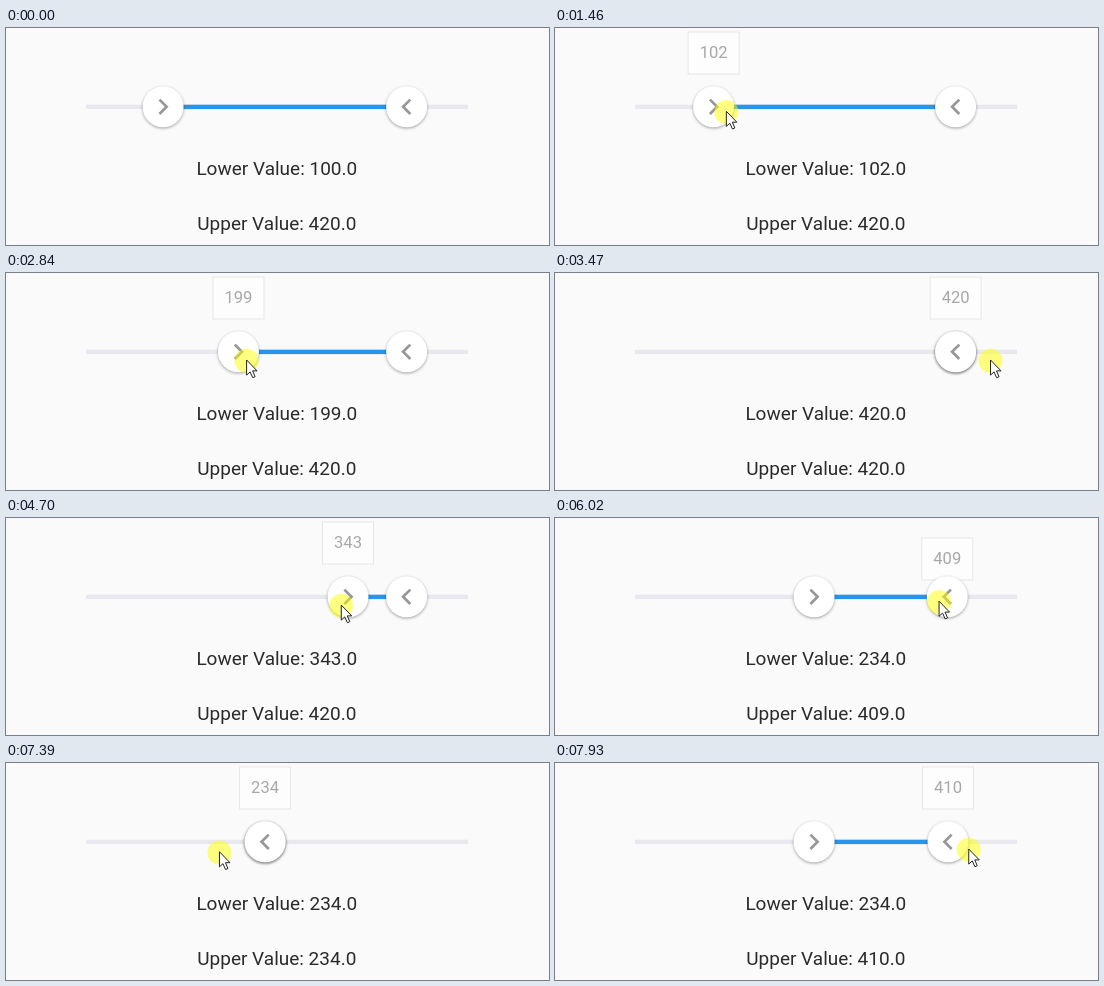
An HTML page that plays this animation: 543x217 px, repeating every 8000 ms.

```html
<!DOCTYPE html>
<html lang="en">
<head>
<meta charset="utf-8">
<title>Range slider</title>
<style>
  html, body { margin: 0; width: 100%; height: 100%; overflow: hidden; background: #fafafa; }
  svg { display: block; width: 543px; height: 217px; font-family: Roboto, sans-serif; }
  text { text-anchor: middle; }
  .label { font-size: 19px; fill: #2b2b2b; }
  .tip rect { fill: #fdfdfd; stroke: #e8e7e5; }
  .tip text { font-size: 16.6px; fill: #a8a8a8; }
  .knob circle { fill: #fff; filter: drop-shadow(0 1px 1.6px rgba(0, 0, 0, .36)); }
  #chevron { fill: #979797; }
</style>
</head>
<body>
<svg viewBox="0 0 543 217">
  <defs>
    <path id="chevron" transform="scale(1.36) translate(-12 -12)" d="M10 6 8.59 7.41 13.17 12l-4.58 4.59L10 18l6-6z"/>
  </defs>
  <rect x="80" y="76.7" width="382" height="4.4" fill="#e8e8ee"/>
  <rect id="range" y="76.7" height="4.4" fill="#2794ee"/>
  <g id="lowerTip" class="tip"><rect x="-25.5" y="4" width="51" height="42"/><text y="30.1"></text></g>
  <g id="upperTip" class="tip"><rect x="-25.5" y="4" width="51" height="42"/><text y="30.1"></text></g>
  <g id="lowerKnob" class="knob"><circle r="20.5"/><use href="#chevron"/></g>
  <g id="upperKnob" class="knob"><circle r="20.5"/><use href="#chevron" transform="scale(-1 1)"/></g>
  <text id="lowerLabel" class="label" x="270.8" y="146.6"></text>
  <text id="upperLabel" class="label" x="270.8" y="201.9"></text>
  <g id="cursor">
    <circle id="press" cy="0.8" r="12" fill="#ff0" opacity=".5"/>
    <path d="M0 0V15.1L3.5 11.9 6.1 17.7 8.5 16.7 6 10.9H10.5Z" fill="#fff" stroke="#222"/>
  </g>
</svg>
<script>
const LOOP = 8000, STEPS = 104, STEP = LOOP / STEPS;
const LAG = 0.6, GRIP = 3;   // the knob trails the pointer in time and place
const LOWER = { press: 14, release: 70 }, UPPER = { press: 77, release: Infinity };
const $ = id => document.getElementById(id);
const clamp = (v, lo, hi) => Math.min(hi, Math.max(lo, v));

// Turning points of the pointer: [step, x, y]
const turns = [[3, 400, 200], [12, 160, 83], [18, 160, 83], [24, 313, 87], [29.45, 286.4, 87],
  [34, 377, 87], [36.5, 235, 87], [40, 336, 87], [47.8, 477, 87], [52, 477, 87], [64, 309, 87],
  [66.5, 367, 86], [69.4, 262, 85], [72, 245, 85], [76.4, 403.6, 83], [82, 305, 84],
  [88.8, 196, 89], [94, 196, 89], [107.5, 490, 85]];

function pointer(s) {
  const i = Math.max(1, turns.findIndex(p => p[0] > s));
  const [a, b] = [turns[i - 1], turns[i]];
  const u = clamp((s - a[0]) / (b[0] - a[0]), 0, 1), ease = u * u * (3 - 2 * u);
  return { x: a[1] + (b[1] - a[1]) * ease, y: a[2] + (b[2] - a[2]) * ease };
}

const toX = value => 81 + 0.761 * value;
const dragged = (s, { press, release }) =>
  Math.round((pointer(clamp(s, press, release) - LAG).x - GRIP - 81) / 0.761);
const move = (id, x, y) => $(id).setAttribute('transform', `translate(${x} ${y})`);
const show = (id, on) => $(id).style.display = on ? '' : 'none';

function drawHandle(name, title, value, s, { press, release }) {
  const x = toX(value);
  const rise = clamp(Math.min(s - press, release + 2 - s) / 3.3, 0, 1);
  move(name + 'Knob', x, 78.8);
  move(name + 'Tip', x, 47 * (1 - rise) ** 3);
  show(name + 'Tip', rise > 0);
  $(name + 'Tip').lastChild.textContent = value;
  $(name + 'Label').textContent = `${title} Value: ${value.toFixed(1)}`;
}

function draw(time) {
  const s = Math.min(STEPS - 1, Math.floor((time % LOOP + 14) / STEP));
  const lower = Math.min(420, dragged(s, LOWER));
  const upper = Math.max(lower, dragged(s, UPPER));
  drawHandle('lower', 'Lower', lower, s, LOWER);
  drawHandle('upper', 'Upper', upper, s, UPPER);
  $('range').setAttribute('x', toX(lower));
  $('range').setAttribute('width', toX(upper) - toX(lower));
  const { x, y } = pointer(s);
  move('cursor', x, y);
  show('cursor', s >= 3);
  show('press', [LOWER, UPPER].some(d => s >= d.press && s < d.release));
}

const start = performance.now();
(function frame() {
  draw(performance.now() - start);
  requestAnimationFrame(frame);
})();
</script>
</body>
</html>
```
